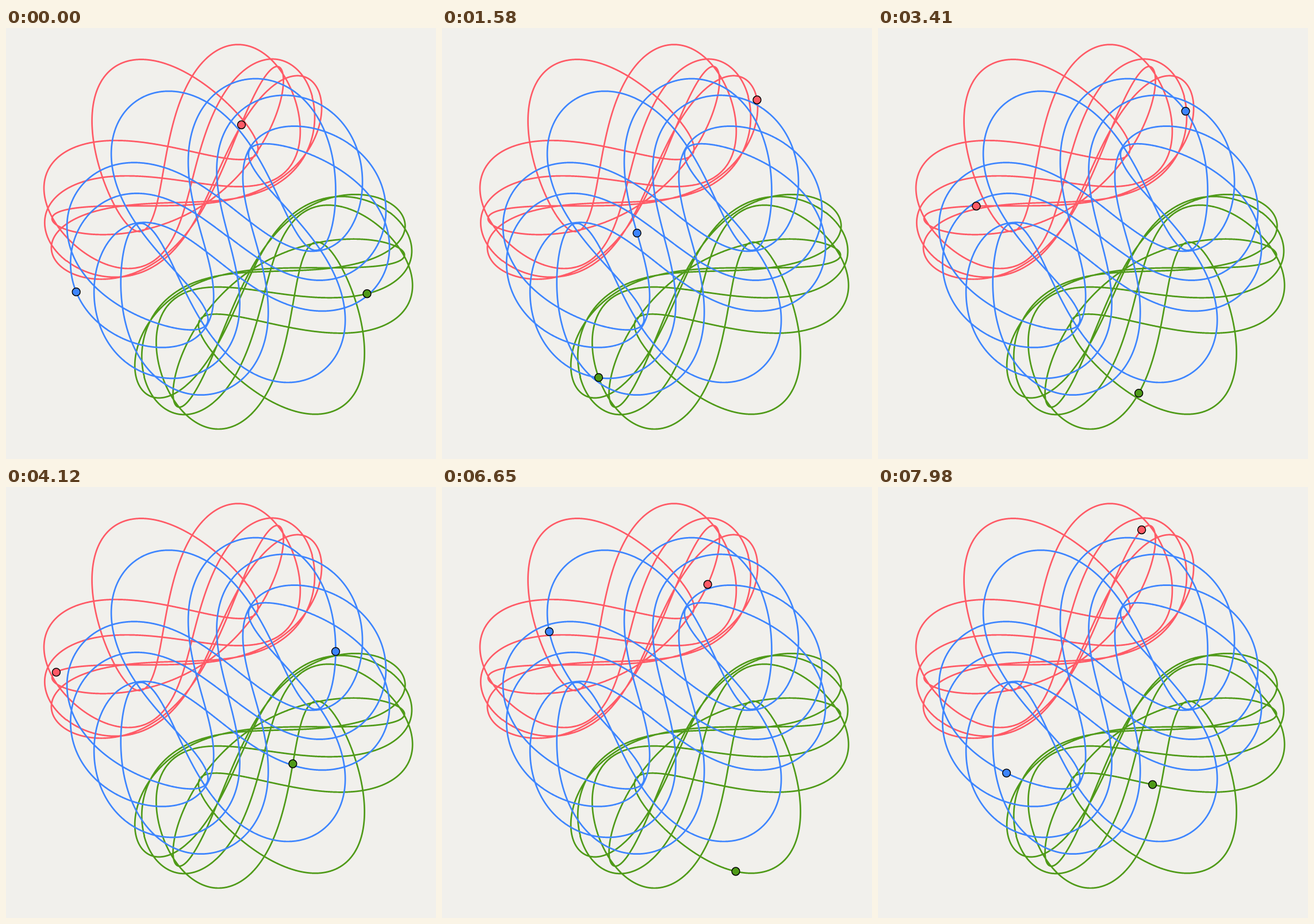
An HTML page with a canvas that plays this animation: 748 by 749 pixels, repeating every 8000 ms.

```html
<!DOCTYPE html>
<html lang="en">
<head>
<meta charset="utf-8">
<title>Periodic three-body orbit</title>
<style>
  html, body { margin: 0; width: 100%; height: 100%; overflow: hidden; background: #f1f0ec; }
  canvas { display: block; }
</style>
</head>
<body>
<canvas id="stage" width="748" height="749"></canvas>
<script>
const W = 748, H = 749, LOOP = 8000;
const CX = 386.6, CY = 362.9;
const COLORS = ['#ff5a66', '#4f9a18', '#3d85ff']; // red, green, blue

// Known places: time (s), weight, then x, y of red, green and blue.
// Ordered by distance in time from the moment when all three bodies line up.
const MARKS = [
  [6.65, 1, 463, 168.7, 510, 668.2, 187, 251.3],
  [5.31, 1, 167, 359, 622, 586.8, 370.8, 142.6],
  [4.92, 0.2, 108.5, 350, 620, 525, 431, 214],
  [4.12, 1, 86.4, 322.4, 500, 476, 573.2, 290],
  [7.98, 1, 460, 73.8, 475.2, 517.5, 224.5, 497.2],
  [3.28, 0.2, 198, 310, 442.5, 654, 519, 125],
  [2.7, 1, 357, 303.7, 381.2, 697, 421.6, 87.8],
  [1.58, 1, 547.6, 123, 272, 606.2, 340, 359.1],
  [0.82, 0.2, 507, 84, 416, 454, 236, 551],
  [0, 1, 410.2, 166.6, 626.8, 461, 123, 461]
];

// State: blue x, y, red x, y, then their velocities. Green balances them.
function slope(y, mu) {
  const [bx, by, rx, ry] = y;
  const pull = (dx, dy) => {
    const k = mu / Math.pow(dx * dx + dy * dy, 1.5);
    return [k * dx, k * dy];
  };
  const br = pull(rx - bx, ry - by);
  const bg = pull(-2 * bx - rx, -2 * by - ry);
  const rg = pull(-bx - 2 * rx, -by - 2 * ry);
  return [y[4], y[5], y[6], y[7],
    br[0] + bg[0], br[1] + bg[1], rg[0] - br[0], rg[1] - br[1]];
}

function rk4(y, h, mu) {
  const add = (k, f) => y.map((v, i) => v + f * k[i]);
  const a = slope(y, mu), b = slope(add(a, h / 2), mu);
  const c = slope(add(b, h / 2), mu), d = slope(add(c, h), mu);
  return y.map((v, i) => v + h / 6 * (a[i] + 2 * b[i] + 2 * c[i] + d[i]));
}

// Step length shrinks when two bodies pass close to each other.
function stepFor([bx, by, rx, ry], mu) {
  const d = Math.min(Math.hypot(rx - bx, ry - by),
    Math.hypot(2 * bx + rx, 2 * by + ry), Math.hypot(bx + 2 * rx, by + 2 * ry));
  return Math.min(0.01, Math.max(1e-4, 0.05 * Math.sqrt(d * d * d / (2 * mu))));
}

// Start on the axis, moving square to it, with no angular momentum.
function fly(p, times) {
  const [b, r, v, m] = p, mu = m * 1e6;
  let y = [b, 0, r, 0, 0, -v * (b + 2 * r) / (2 * b + r), 0, v], now = 0;
  return times.map(time => {
    const t = Math.min(time, 12);
    while (Math.abs(t - now) > 1e-12) {
      const left = t - now, h = stepFor(y, mu);
      const last = Math.abs(left) <= h;
      const dt = last ? left : h * Math.sign(left);
      y = rk4(y, dt, mu);
      now = last ? t : now + dt;
    }
    return y;
  });
}

const bodies = y => [[y[2], y[3]], [-y[0] - y[2], -y[1] - y[3]], [y[0], y[1]]];

function toScreen([u, w], angle) {
  const c = Math.cos(angle), s = Math.sin(angle);
  return [CX + u * c - w * s, CY - u * s - w * c];
}

// At a quarter period blue is in the centre, red and green move alike.
const openness = y => [y[0], y[1], 0.3 * (y[4] + 2 * y[6]), 0.3 * (y[5] + 2 * y[7])];

// Distances from the first n marks, and the weighted openness of the orbit.
function misses(p, n, closing) {
  const [, , , , angle, mid, quarter] = p;
  const rows = MARKS.slice(0, n), times = rows.map(r => Math.abs(r[0] - mid));
  if (closing) times.push(quarter);
  const path = fly(p, times), out = [];
  rows.forEach(([t, weight, ...xy], i) => {
    const side = t < mid ? -1 : 1;
    bodies(path[i]).forEach(([u, w], k) => {
      const [x, y] = toScreen([u, w * side], angle);
      out.push(weight * (x - xy[2 * k]), weight * (y - xy[2 * k + 1]));
    });
  });
  if (closing) out.push(...openness(path[n]).map(v => closing * v));
  return out;
}

const dot = (a, b) => a.reduce((sum, v, i) => sum + v * b[i], 0);

function solve(A, g) {
  const n = g.length, M = A.map((row, i) => [...row, g[i]]);
  for (let i = 0; i < n; i++) {
    for (let j = 0; j < n; j++) {
      if (j === i) continue;
      const f = M[j][i] / M[i][i];
      for (let k = i; k <= n; k++) M[j][k] -= f * M[i][k];
    }
  }
  return M.map((row, i) => row[n] / row[i]);
}

// Damped least squares over the first m parameters.
function fit(p, m, miss) {
  let damp = 1e-3, r = miss(p), cost = dot(r, r), J = null;
  for (let k = 0; k < 80 && damp < 1e9; k++) {
    if (!J) {
      J = [];
      for (let i = 0; i < m; i++) {
        const q = p.slice(), h = 1e-6 * Math.abs(p[i]);
        q[i] += h;
        J.push(miss(q).map((v, j) => (v - r[j]) / h));
      }
    }
    const A = J.map(a => J.map(b => dot(a, b)));
    A.forEach((row, i) => { row[i] *= 1 + damp; });
    const move = solve(A, J.map(a => -dot(a, r)));
    const q = p.map((v, i) => i < m ? v + move[i] : v);
    const rq = miss(q), cq = dot(rq, rq);
    if (cq < cost) {
      const done = damp < 1 && cost - cq < 1e-4 * cost;
      p = q; r = rq; cost = cq; damp /= 6; J = null;
      if (done) break;
    } else {
      damp *= 4;
    }
  }
  return { p, cost };
}

// Blue and red offsets, red speed, gravity, axis angle, mid time, quarter period.
function findOrbit() {
  const all = MARKS.length;
  const first = fit([282.5, 71, -321, 19.4, 2.157, 6.002, 7.7], 6, q => misses(q, 3)).p;
  let best = { cost: Infinity };
  for (const nudge of [0, 0.006, -0.006, 0.015, -0.015, 0.03, -0.03]) {
    let run = { p: first.map((v, i) => i === 2 ? v * (1 + nudge) : v) };
    for (let n = 4; n <= all; n++) run = fit(run.p, 6, q => misses(q, n));
    if (run.cost < best.cost) best = run;
    if (best.cost < 150) break;
  }
  const p = best.p, times = Array.from({ length: 281 }, (_, i) => 6.6 + i * 0.01);
  const gaps = fly(p, times).map(y => Math.hypot(...openness(y)));
  p[6] = times[gaps.indexOf(Math.min(...gaps))];
  return [0.1, 0.5, 3].reduce((q, c) => fit(q, 7, v => misses(v, all, c)).p, p);
}

const orbit = findOrbit();
const [angle, mid, quarter] = orbit.slice(4);
const STEPS = 3000;
const samples = fly(orbit, Array.from({ length: STEPS + 1 }, (_, i) => i * quarter / STEPS)).map(bodies);

// Screen places of the bodies, s seconds after the mid time.
function placesAt(s) {
  const period = 4 * quarter;
  s = ((s + quarter) % period + period) % period - quarter;
  const turned = s > quarter;
  if (turned) s = 2 * quarter - s;
  const pos = Math.min(Math.abs(s) / quarter, 1) * STEPS;
  const i = Math.min(Math.floor(pos), STEPS - 1), f = pos - i;
  const side = s < 0 ? -1 : 1, turn = turned ? -1 : 1;
  const pts = samples[i].map(([u, w], k) => {
    const [u2, w2] = samples[i + 1][k];
    return toScreen([turn * (u + f * (u2 - u)), turn * side * (w + f * (w2 - w))], angle);
  });
  return turned ? [pts[1], pts[0], pts[2]] : pts;
}

function drawTraces() {
  const layer = document.createElement('canvas');
  layer.width = W;
  layer.height = H;
  const g = layer.getContext('2d');
  g.fillStyle = '#f1f0ec';
  g.fillRect(0, 0, W, H);
  g.lineWidth = 2.7;
  g.lineJoin = 'round';
  const N = 4 * STEPS;
  const track = Array.from({ length: N }, (_, i) => placesAt(4 * quarter * i / N));
  COLORS.forEach((color, k) => {
    g.beginPath();
    track.forEach(pts => g.lineTo(...pts[k]));
    g.closePath();
    g.strokeStyle = color;
    g.stroke();
  });
  return layer;
}

const ctx = document.getElementById('stage').getContext('2d');
const traces = drawTraces();

function draw(ms) {
  ctx.drawImage(traces, 0, 0);
  ctx.lineWidth = 1.5;
  ctx.strokeStyle = '#000';
  placesAt(ms / 1000 - mid).forEach(([x, y], k) => {
    ctx.beginPath();
    ctx.arc(x, y, 6.9, 0, 2 * Math.PI);
    ctx.fillStyle = COLORS[k];
    ctx.fill();
    ctx.stroke();
  });
}

const begin = performance.now();
function tick() {
  draw((performance.now() - begin) % LOOP);
  requestAnimationFrame(tick);
}
tick();
</script>
</body>
</html>
```
